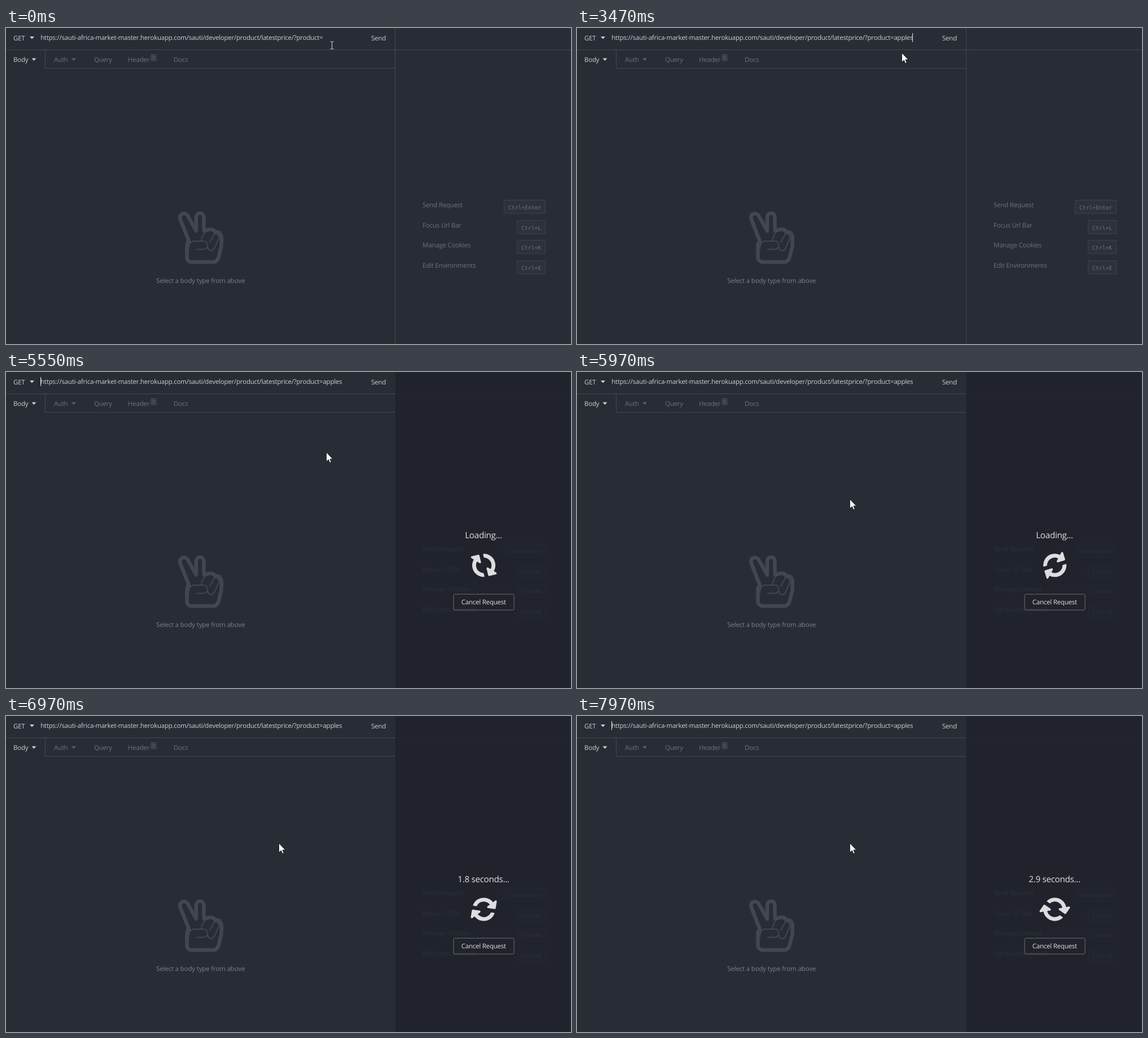
An HTML page that plays this animation: 1001 px wide and 559 px high, repeating every 7.99 s.

```html
<!DOCTYPE html>
<html lang="en">
<head>
<meta charset="utf-8">
<title>Request</title>
<style>
  html, body { margin: 0; width: 100%; height: 100%; overflow: hidden; background: #282c34; }
  svg { display: block; width: 1001px; height: 559px; }
  text {
    font: 11.5px "Open Sans", "Noto Sans", sans-serif;
    letter-spacing: -.21px;
    font-kerning: none;
    text-rendering: geometricPrecision;
    fill: #6d727b;
    white-space: pre;
  }
  .lit text, text.lit { fill: #ccced2; }
  #url { letter-spacing: -.243px; }
  #keys text.key { font: 9.7px "DejaVu Sans Mono", monospace; letter-spacing: 0; }
  #keys rect { fill: #2d313a; stroke: #3d424b; }
  .rule { fill: none; stroke: #454a53; }
  #hand { fill: none; stroke: #41464f; stroke-linejoin: round; stroke-linecap: round; }
  #overlay text { fill: #e0e1e3; text-anchor: middle; }
  #overlay #status { font-size: 15.2px; letter-spacing: -.3px; }
</style>
</head>
<body>
<svg viewBox="0 0 1001 559">
  <rect width="1001" height="559" fill="#282c34"/>
  <rect id="hover" x="631" width="58" height="38" fill="#2e323b"/>
  <path class="rule" d="M0 38.5H1001M689.5 0V559M69.5 38V71.5H689"/>

  <g class="lit">
    <text x="13" y="22">GET</text>
    <text id="url" x="61.3" y="21"></text>
    <text x="647" y="22">Send</text>
    <text x="13" y="60">Body</text>
  </g>
  <text x="85" y="60">Auth</text>
  <text x="156" y="60">Query</text>
  <text x="216" y="60">Header</text>
  <text x="297" y="60">Docs</text>
  <path fill="#ccced2" d="M42 15h8l-4 4.5zM45.500 53.500h8l-4 4.500z"/>
  <path fill="#5d626b" d="M116 53.500h8l-4 4.500z"/>
  <rect x="256" y="46" width="11" height="13" rx="2" fill="#3a3f48"/>
  <text x="259.300" y="56" style="font-size:8.5px">1</text>
  <rect id="caret" y="9" width="1" height="16" fill="#e4e5e8"/>

  <g id="hand">
    <path stroke-width="6.600" d="M329 414H366C371 414 375 411 376.500 406L381 388Q381.700 384 381.700 380V371C381.700 364 377 360 371 361C368 355 360 355 352 359L350.500 357V335C350.500 330 347 327.500 344 327.500C340 327.500 337 331 337 335V359L323 334C321 329 316 327.500 312 329C308 331 307.500 335 309 339L324 377C321 379 320.500 382 320.500 385V405C320.500 411 324 414 329 414Z"/>
    <path stroke-width="2" d="M324 391C324 381 328 377 334 377H350C355 377 357.500 381 357.500 384C357.500 389 353 391.500 349 391.500H338M352 360L345 377M371 361L361 379M357 387C358 393 365 397 369 390L377 373C378 368 374 363 371 364"/>
  </g>
  <text x="266.300" y="451" style="letter-spacing:-.17px;fill:#7b8089">Select a body type from above</text>

  <g id="keys"></g>

  <g id="overlay">
    <rect x="689" width="312" height="559" fill="#1f222a" opacity=".83"/>
    <text id="status" x="846" y="293.500"></text>
    <path id="spinner" fill="#dcdddf" d="M1511 480q0-5-1-7q-64-268-268-434.500t-478-166.500q-146 0-282.500 55t-243.500 157l-129-129q-19-19-45-19t-45 19t-19 45v448q0 26 19 45t45 19h448q26 0 45-19t19-45t-19-45l-137-137q71-66 161-102t187-36q134 0 250 65t186 179q11 17 53 117q8 23 30 23h192q13 0 22.500-9.500t9.500-22.500zM1536 1280v-448q0-26-19-45t-45-19h-448q-26 0-45 19t-19 45t19 45l138 138q-148 137-349 137q-134 0-250-65t-186-179q-11-17-53-117q-8-23-30-23h-199q-13 0-22.500 9.500t-9.500 22.500v7q65 268 270 434.500t480 166.500q146 0 284-55.500t245-156.500l130 129q19 19 45 19t45-19t19-45z"/>
    <rect x="793" y="393" width="107" height="28" rx="2.500" fill="none" stroke="#6c6f75"/>
    <text x="846.300" y="411">Cancel Request</text>
  </g>

  <path id="arrow" fill="#fff" stroke="#15171b" stroke-width=".9" d="M.5 0V16.500L4.300 13L6.700 18.500L9.300 17.400L6.900 12H12Z"/>
  <path id="beam" fill="none" stroke="#dfe0e2" d="M-3 -6.500H-1L0 -5.500L1 -6.500H3M0 -5.500V5.500M-3 6.500H-1L0 5.500L1 6.500H3"/>
</svg>
<script>
const LOOP = 7990, SENT = 5170, BLINK = 463;
const BASE = 'https://sauti-africa-market-master.herokuapp.com/sauti/developer/product/latestprice/?product=';
const WORD = 'apples';
const typedAt = [1340, 1650, 1860, 3160, 3340, 3470];
const caretX = [561, 567, 574, 581, 583, 589, 594];
const caretToggles = [310, 780, 1310, 2380, 2910, 3960, 4490, 4920];
// time, x, y of the pointer's hot spot
const pointer = [
  [0, 577.5, 30], [600, 577.5, 30], [780, 575, 44], [4160, 575, 44],
  [4230, 535, 12], [4380, 535, 12], [4650, 622, 17], [4920, 679, 27],
  [5250, 679, 27], [5480, 598, 112], [5700, 503, 206], [5850, 483, 225], [LOOP, 483, 225]
];
const $ = id => document.getElementById(id);
const show = (id, on) => $(id).setAttribute('visibility', on ? 'visible' : 'hidden');
const countPast = (times, t) => times.filter(at => at <= t).length;

$('keys').innerHTML = [
  ['Send Request', 'Enter', 304.5], ['Focus Url Bar', 'L', 340.5],
  ['Manage Cookies', 'K', 375.5], ['Edit Environments', 'E', 411.5]
].map(([label, key, y]) => {
  const left = key === 'Enter' ? 882.5 : 905.5;
  return `<text x="738" y="${y + 12.5}">${label}</text>
    <rect x="${left}" y="${y}" width="${955.5 - left}" height="23.5"/>
    <text class="key" x="${left + 7.5}" y="${y + 16}">Ctrl+${key}</text>`;
}).join('');

function pointerAt(t) {
  const i = pointer.findIndex(p => p[0] > t);
  const [t0, x0, y0] = pointer[i - 1], [t1, x1, y1] = pointer[i];
  const k = (t - t0) / (t1 - t0);
  return [x0 + (x1 - x0) * k, y0 + (y1 - y0) * k];
}

function draw(t) {
  const sent = t >= SENT;
  const typed = countPast(typedAt, t);
  $('url').textContent = BASE + WORD.slice(0, typed);

  const caretOn = sent
    ? Math.floor((t - SENT) / BLINK) % 2 === 0
    : countPast(caretToggles, t) % 2 === 1;
  show('caret', caretOn);
  $('caret').setAttribute('x', sent ? 61 : caretX[typed]);

  const [x, y] = pointerAt(t);
  const inBar = y < 38;
  const overSend = inBar && x >= 631;
  const overUrl = inBar && !overSend;
  show('hover', overSend);
  show('beam', overUrl);
  show('arrow', !overUrl);
  $('beam').setAttribute('transform', `translate(${Math.floor(x) + .5} ${Math.round(y) + .5})`);
  $('arrow').setAttribute('transform', `translate(${Math.round(x)} ${Math.round(y)})`);

  show('overlay', sent);
  const seconds = 1.39 + 1.145 * (t - 6580) / 1000;
  $('status').textContent = seconds < 1
    ? 'Loading...'
    : (Math.floor(seconds * 10) / 10).toFixed(1) + ' seconds...';
  const angle = .206 * (t - 5180);
  $('spinner').setAttribute('transform',
    `translate(846.5 342) rotate(${angle}) scale(.0268 -.0268) translate(-768 -640)`);
}

const start = performance.now();
function tick() {
  draw(Math.max(0, performance.now() - start) % LOOP);
  requestAnimationFrame(tick);
}
tick();
</script>
</body>
</html>
```
